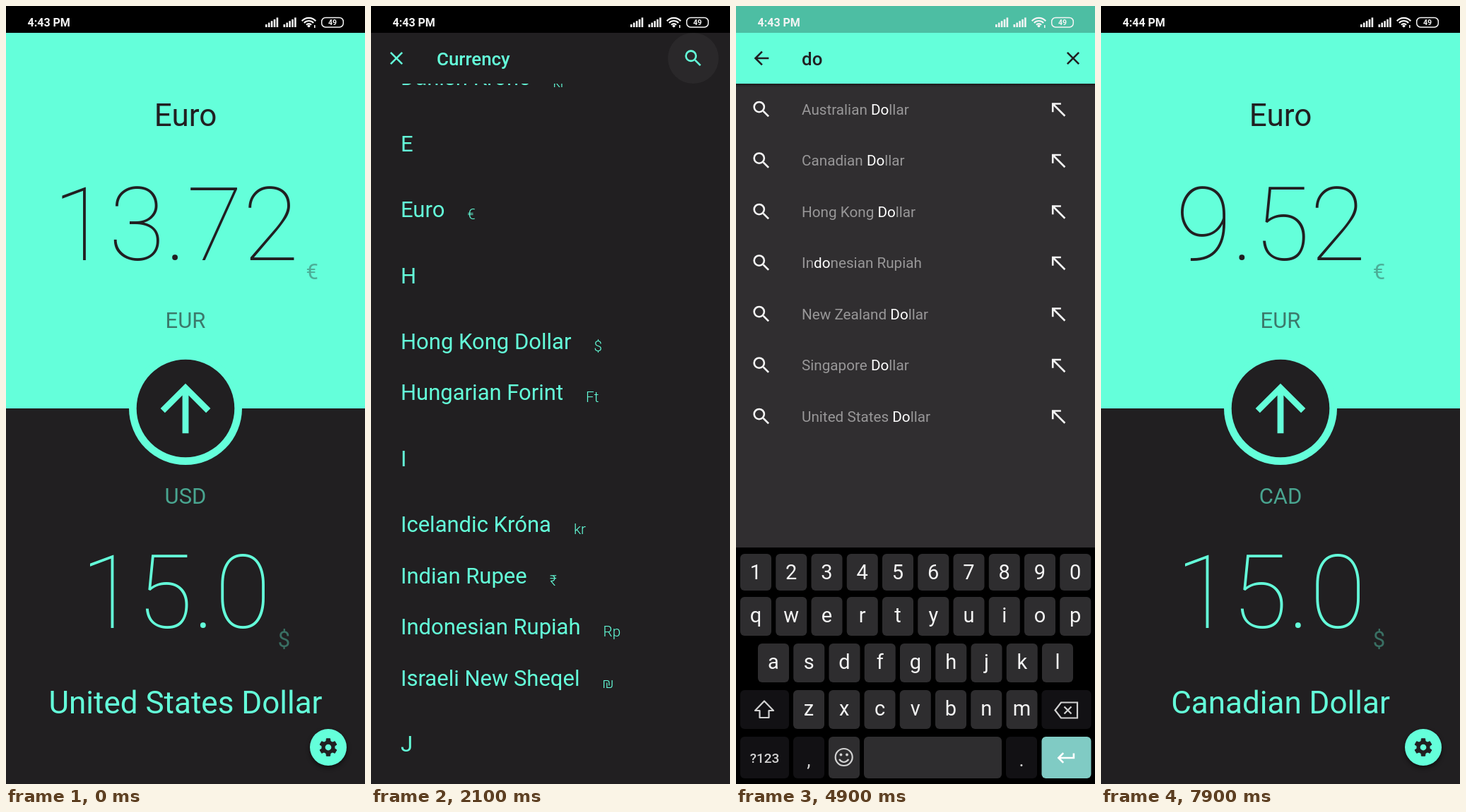
Animation of 508x1102 px, one loop 8 s. Source, as an HTML page:

```html
<!DOCTYPE html>
<html lang="en">
<head>
<meta charset="utf-8">
<title>Currency converter</title>
<style>
  html, body { margin: 0; width: 100%; height: 100%; overflow: hidden; background: #000; }
  svg { display: block; }
  #stage { width: 508px; height: 1102px; overflow: hidden; }
  text { font-family: Roboto, sans-serif; white-space: pre; }
  .mid { text-anchor: middle; }
</style>
</head>
<body>
<svg id="stage" viewBox="0 0 508 1102" xmlns="http://www.w3.org/2000/svg"></svg>
<script>
const TEAL = '#64ffda', DARK = '#211f21', PANEL = '#302e30', WHITE = '#f4f4f4';
const LOOP = 8000, STEP = 100, ROW = 72.5, DP = 1.2935;

const ICON = {
  up: 'M4 12l1.41 1.41L11 7.83V20h2V7.83l5.58 5.59L20 12l-8-8-8 8z',
  back: 'M20 11H7.83l5.59-5.59L12 4l-8 8 8 8 1.41-1.41L7.83 13H20v-2z',
  close: 'M19 6.41L17.59 5 12 10.59 6.41 5 5 6.41 10.59 12 5 17.59 6.41 19 12 13.41 17.59 19 19 17.59 13.41 12z',
  corner: 'M5 15h2V8.41L18.59 20 20 18.59 8.41 7H15V5H5v10z',
  enter: 'M19 7v4H5.83l3.58-3.59L8 6l-6 6 6 6 1.41-1.41L5.83 13H21V7z',
  history: 'M13 3c-4.97 0-9 4.03-9 9H1l3.89 3.89.07.14L9 12H6c0-3.87 3.13-7 7-7s7 3.13 7 7-3.13 7-7 7' +
    'c-1.93 0-3.68-.79-4.94-2.06l-1.42 1.42C8.27 19.99 10.51 21 13 21c4.97 0 9-4.03 9-9s-4.03-9-9-9z' +
    'm-1 5v5l4.28 2.54.72-1.21-3.5-2.08V8H12z'
};

// Markup helpers
const rect = (x, y, w, h, fill, more = '') =>
  `<rect x="${x}" y="${y}" width="${w}" height="${h}" fill="${fill}" ${more}/>`;
const circle = (x, y, r, fill, more = '') =>
  `<circle cx="${x}" cy="${y}" r="${r}" fill="${fill}" ${more}/>`;
const line = (d, color, w, more = '') =>
  `<path d="${d}" fill="none" stroke="${color}" stroke-width="${w}" ${more}/>`;
const text = (x, y, size, fill, body, more = '') =>
  `<text x="${x}" y="${y}" font-size="${size}" fill="${fill}" ${more}>${body}</text>`;
const at = (x, y, scale, body) =>
  `<g transform="translate(${x - 12 * scale} ${y - 12 * scale}) scale(${scale})">${body}</g>`;
const icon = (name, x, y, color, scale = DP) =>
  at(x, y, scale, `<path d="${ICON[name]}" fill="${color}"/>`);
const lens = (x, y, color) => at(x, y, DP,
  circle(9.5, 9.5, 5.5, 'none', `stroke="${color}" stroke-width="2"`) + line('M14 14L19.8 19.8', color, 2.1));
const group = (id, body) => `<g id="${id}">${body}</g>`;
const ripple = (id, x, y, w, h, cx, cy, color) =>
  `<svg x="${x}" y="${y}" width="${w}" height="${h}" overflow="hidden">` +
  circle(cx - x, cy - y, 0, color, `id="${id}" opacity="0"`) + '</svg>';

function gear(x, y, s) {
  const pts = [];
  for (let k = 0; k < 6; k++) {
    for (const [r, deg] of [[7.3, -19], [10, -12], [10, 12], [7.3, 19]]) {
      const a = (k * 60 + deg - 90) * Math.PI / 180;
      pts.push((x + s * r * Math.cos(a)).toFixed(2) + ' ' + (y + s * r * Math.sin(a)).toFixed(2));
    }
  }
  return `<path d="M${pts.join('L')}Z" fill="${DARK}" stroke="${DARK}" stroke-linejoin="round"/>` +
    circle(x, y, 3.5 * s, TEAL);
}

function amount(y, value, sign, color) {
  return text(254, y, 144.9, color, value +
    `<tspan dx="10" dy="26.5" font-size="31" font-weight="400" opacity=".6" fill-opacity=".6">${sign}</tspan>`,
    'class="mid" font-weight="100"');
}

function home(id, euros, code, name, press = '') {
  const mid = 'class="mid"';
  return group(id,
    rect(0, 38, 508, 532, TEAL) + rect(0, 570, 508, 540, DARK) + press +
    text(254, 169.5, 44, DARK, 'Euro', mid) +
    amount(360, euros, '€', DARK) +
    text(254, 456, 31, DARK, 'EUR', mid + ' fill-opacity=".6"') +
    circle(254, 570, 80, TEAL) + circle(254, 570, 69.3, DARK) + icon('up', 254, 570, TEAL, 4.42) +
    text(254, 705, 31, TEAL, code, mid + ' fill-opacity=".6"') +
    amount(881, '15.0', '$', TEAL) +
    text(254, 1002, 44, TEAL, name, mid) +
    circle(456, 1053, 26, '#000', 'opacity=".55" filter="url(#blur)"') +
    circle(456, 1050, 26, TEAL) + gear(456, 1050, 1.25));
}

function currencies() {
  const rows = [['Danish Krone', 'kr'], ['E'], ['Euro', '€'], ['H'], ['Hong Kong Dollar', '$'],
    ['Hungarian Forint', 'Ft'], ['I'], ['Icelandic Króna', 'kr'], ['Indian Rupee', '₹'],
    ['Indonesian Rupiah', 'Rp'], ['Israeli New Sheqel', '₪'], ['J']];
  let top = 65.2, body = '';
  for (const [name, sign] of rows) {
    const h = sign ? ROW : 114.2;
    body += text(42, top + h / 2 + 11, 31, TEAL, name + (sign ?
      `<tspan dx="32" dy="3" font-size="20.7" font-weight="300">${sign}</tspan>` : ''));
    top += h;
  }
  return group('list', rect(0, 38, 508, 1072, DARK) + body + rect(0, 38, 508, 72, DARK) +
    icon('close', 36, 74, TEAL) + text(93, 83.5, 25.9, TEAL, 'Currency', 'font-weight="500"') +
    ripple('tap', 416, 38, 80, 72, 456, 74, '#fff') + lens(456, 74, TEAL));
}

function search() {
  return group('search', rect(0, 38, 508, 1072, PANEL) +
    ripple('pick', 0, 182.5, 508, ROW, 330, 219, '#fff') +
    group('hits', '') +
    rect(0, 110, 508, 5, 'url(#shade)') + rect(0, 38, 508, 72, TEAL) +
    icon('back', 36, 74, DARK) + icon('close', 477, 74, DARK) +
    text(93, 83.5, 25.9, DARK, '', 'id="query" font-weight="500"') +
    rect(93, 62, 2, 25, DARK, 'id="caret"'));
}

function keyboard() {
  const key = (x, y, w, h, fill) => rect(x, y, w, h, fill, 'rx="6"');
  const LIGHT = '#2e2d2f', DIM = '#121114', GREY = '#d2d2d2', PITCH = 50.25;
  let out = rect(0, 767, 508, 345, '#000');
  [['1234567890', 6, 776, 52], ['qwertyuiop', 6, 837, 55], ['asdfghjkl', 31, 903, 55], ['zxcvbnm', 81, 969, 55]]
    .forEach(([chars, x0, y, h]) => [...chars].forEach((c, i) => {
      const x = x0 + i * PITCH;
      out += key(x, y, 44, h, LIGHT) + text(x + 22, y + 36, 29, WHITE, c, 'class="mid"');
    }));
  out += key(6, 969, 69, 55, DIM) + key(432.5, 969, 70, 55, DIM) +
    key(6, 1035, 69, 59, DIM) + key(81, 1035, 44, 59, DIM) + key(131, 1035, 44, 59, LIGHT) +
    key(181, 1035, 195, 59, LIGHT) + key(382, 1035, 44, 59, DIM) + key(432.5, 1035, 70, 59, '#80cbc4');
  out += line('M40 984.5L53 998H46.5V1008H33.500V998H27Z', GREY, 2.2, 'stroke-linejoin="round"') +
    line('M460 986.500H483V1008.500H460L451.500 997.500ZM464.500 992.500L474.500 1002.500M474.500 992.500L464.500 1002.500', GREY, 2.2) +
    text(40.5, 1071.5, 19, GREY, '?123', 'class="mid" font-weight="500"') +
    text(103, 1077, 27, GREY, ',', 'class="mid"') + text(404, 1077, 27, GREY, '.', 'class="mid"') +
    circle(152.7, 1064, 12, 'none', `stroke="${GREY}" stroke-width="2.2"`) +
    circle(148.5, 1060.5, 1.9, GREY) + circle(157, 1060.5, 1.9, GREY) +
    line('M146 1067Q152.700 1075 159.400 1067', GREY, 2.2) +
    icon('enter', 467.5, 1065, '#fff', 1.3);
  return group('keys', out);
}

function statusBar() {
  let out = rect(0, 0, 508, 38, '#000') + rect(0, 0, 508, 38, '#4dbea3', 'id="tint"') +
    text(30.5, 29, 16, WHITE, '', 'id="clock" font-weight="600"');
  for (const x of [367, 392.5])
    for (let i = 0; i < 5; i++) {
      const h = 4 + 2.4 * i;
      out += rect(x + 3.9 * i, 30 - h, 2.6, h, WHITE);
    }
  for (const r of [4.8, 9, 13.2]) {
    const d = r * 0.74;
    out += line(`M${428.5 - d} ${30 - r * 0.67}A${r} ${r} 0 0 1 ${428.5 + d} ${30 - r * 0.67}`, WHITE, 2.2);
  }
  return out + circle(428.5, 28.3, 1.9, WHITE) + rect(436, 27, 1.6, 4, WHITE) +
    rect(446.7, 16.5, 30.6, 13.5, 'none', `rx="5.5" stroke="${WHITE}" stroke-width="1.5"`) +
    text(462, 27, 10.5, WHITE, '49', 'class="mid" font-weight="700"');
}

const stage = document.getElementById('stage');
stage.innerHTML =
  '<defs><filter id="blur" x="-50%" y="-50%" width="200%" height="200%"><feGaussianBlur stdDeviation="3"/></filter>' +
  '<linearGradient id="shade" x2="0" y2="1"><stop stop-opacity=".4"/><stop offset="1" stop-opacity="0"/></linearGradient></defs>' +
  home('before', '13.72', 'USD', 'United States Dollar', ripple('press', 0, 570, 508, 532, 254, 860, '#fff')) +
  currencies() + search() +
  home('after', '13.72', 'USD', 'United States Dollar') +
  home('updated', '9.52', 'CAD', 'Canadian Dollar') +
  keyboard() + statusBar();

const el = id => document.getElementById(id);
const set = (id, attrs) => { for (const k in attrs) el(id).setAttribute(k, attrs[k]); };
const clamp = v => Math.min(1, Math.max(0, v));
const part = (t, from, to) => clamp((t - from) / (to - from));
const show = (id, on) => { el(id).style.display = on ? '' : 'none'; };

// Screen opening: linear fade, then a short decelerating rise
function enter(id, t, start) {
  const rise = 84 * Math.pow(1 - part(t, start + 89, start + 405), 5);
  set(id, { opacity: part(t, start, start + 317), transform: `translate(0 ${rise.toFixed(2)})` });
}

function splash(id, t, start, grow, end, r0, r1, alpha) {
  const p = part(t, start, grow);
  set(id, {
    r: r0 + (r1 - r0) * p,
    opacity: t < start ? 0 : alpha * (1 - part(t, grow, end))
  });
}

const DOLLARS = ['Australian Dollar', 'Canadian Dollar', 'Hong Kong Dollar', 'Indonesian Rupiah',
  'New Zealand Dollar', 'Singapore Dollar', 'United States Dollar'];
const WITH_D = ['Australian Dollar', 'Canadian Dollar', 'Danish Krone', 'Hong Kong Dollar', 'Indian Rupee',
  'Indonesian Rupiah', 'New Zealand Dollar', 'Pound Sterling', 'Singapore Dollar'];
const RECENT = ['Canadian Dollar', ...DOLLARS.filter(n => n !== 'Canadian Dollar')];

const TYPING = [
  { from: 0, query: '', names: ['Euro'], recent: true, caret: 93, blink: 2600 },
  { from: 3200, query: 'd', names: WITH_D, caret: 108, blink: 3200 },
  { from: 3400, query: 'do', names: DOLLARS, caret: 122.5, blink: 3400 },
  { from: 6300, query: 'do', names: RECENT, recent: true, caret: 122.5, blink: 3400 }
];

let typed;
function fill(state) {
  if (state === typed) return;
  typed = state;
  const { query, names, recent } = state;
  el('query').textContent = query || 'Search';
  el('hits').innerHTML = names.map((name, i) => {
    const y = 146.3 + i * ROW;
    const label = query ? name.replace(new RegExp(query, 'i'), m => `<tspan fill="#fff">${m}</tspan>`) : name;
    return (recent && i === 0 ? icon('history', 36, y, WHITE) : lens(36, y, WHITE)) +
      text(93, y + 7.2, 20.7, '#989798', label) + icon('corner', 456, y, WHITE);
  }).join('');
}

function draw(t) {
  splash('press', t, 500, 800, 1100, 40, 420, 0.07);
  splash('tap', t, 1700, 1900, 2200, 8, 36, 0.12);
  splash('pick', t, 6300, 6400, 6500, 172, 330, 0.12);

  show('before', t < 2600);
  show('list', t >= 1100 && t < 2600);
  show('search', t >= 2200 && t < 6600);
  show('after', t >= 6200 && t < 6800);
  show('updated', t >= 6800);
  enter('list', t, 1091);
  enter('search', t, 2191);
  enter('after', t, 6211);

  const state = TYPING.filter(s => t >= s.from).pop();
  fill(state);
  set('caret', { x: state.caret });
  show('caret', t >= state.blink && Math.floor((t - state.blink) / 500) % 2 === 0);

  const out = part(t, 6300, 6500);
  const drop = t < 6000 ? Math.pow(1 - part(t, 2500, 2800), 2.66) : out * out * (3 - 2 * out);
  show('keys', drop < 1);
  set('keys', { transform: `translate(0 ${(335 * drop).toFixed(2)})` });

  set('tint', { opacity: part(t, 2150, 2400) * (1 - part(t, 6500, 6800)) });
  el('clock').textContent = t < 5300 ? '4:43 PM' : '4:44 PM';
}

const start = performance.now();
function tick() {
  const t = (performance.now() - start) % LOOP;
  draw(Math.floor(t / STEP) * STEP);
  requestAnimationFrame(tick);
}
tick();
</script>
</body>
</html>
```
